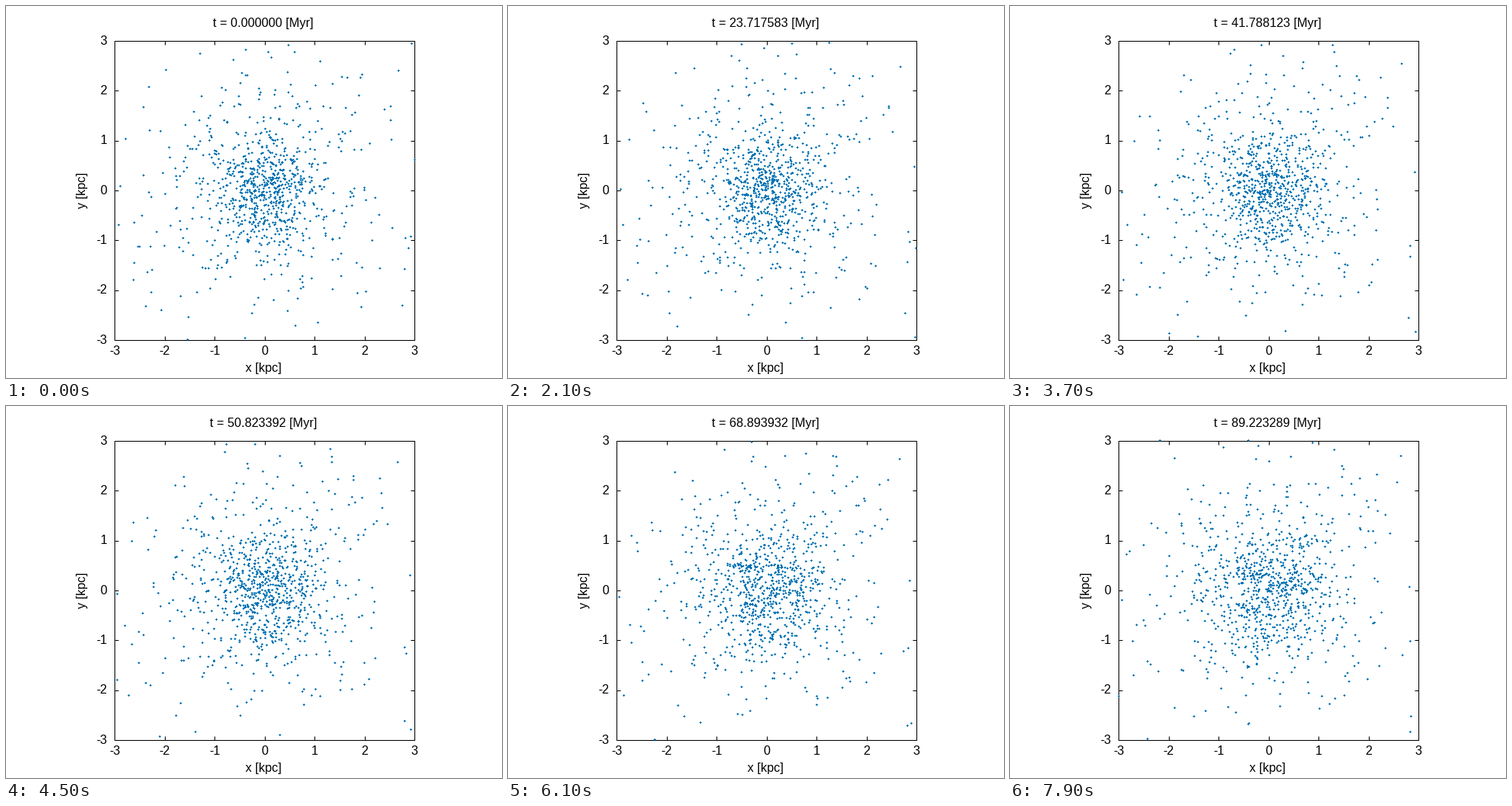
These frames come from a looping animation (640x480 px, 8000 ms). A matplotlib script:

```python
import matplotlib.pyplot as plt
import numpy as np
from matplotlib.animation import FuncAnimation
from matplotlib.path import Path

W, H, DPI = 640, 480, 100
PX = 72 / DPI                      # one pixel in points
FRAMES, INTERVAL = 80, 100
DT = 1.12940872                    # Myr per frame
N, A, GM = 1000, 0.93, 4.5e-4      # stars, scale radius [kpc], kpc^3/Myr^2
HEAT = 1.12                        # slightly faster than equilibrium
LEFT, RIGHT, TOP, BOTTOM = 140, 527, 45, 431

plt.rcParams["font.family"] = "Liberation Sans"
plt.rcParams["font.size"] = 16 * PX


def directions(rng, n):
    v = rng.normal(size=(n, 3))
    return v / np.linalg.norm(v, axis=1, keepdims=True)


def plummer(rng):
    """Positions and velocities of a Plummer sphere."""
    r = A / np.sqrt(rng.uniform(0.001, 0.998, N) ** (-2 / 3) - 1)
    escape = np.sqrt(2 * GM) * (r * r + A * A) ** -0.25
    speed = HEAT * escape * np.sqrt(rng.beta(1.5, 4.5, N))
    return r[:, None] * directions(rng, N), speed[:, None] * directions(rng, N)


def accel(p):
    r2 = (p * p).sum(axis=1, keepdims=True)
    return -GM * p * (r2 + A * A) ** -1.5


def orbits(substeps=4):
    """Leapfrog the stars and keep the x-y projection of every frame."""
    p, v = plummer(np.random.default_rng(12))
    h = DT / substeps
    track = []
    for _ in range(FRAMES):
        xy = p[:, :2].copy()
        xy[(np.abs(xy) > 3).any(axis=1)] = np.nan
        track.append(xy)
        for _ in range(substeps):
            v = v + accel(p) * h / 2
            p = p + v * h
            v = v + accel(p) * h / 2
    return track


def label(x, y, s, ha="center", **kw):
    return fig.text(x / W, 1 - y / H, s, ha=ha, va="baseline", **kw)


fig = plt.figure(figsize=(W / DPI, H / DPI), dpi=DPI, facecolor="white")
ax = fig.add_axes([LEFT / W, 1 - BOTTOM / H, (RIGHT - LEFT) / W, (BOTTOM - TOP) / H])
ticks = range(-3, 4)
ax.set(xlim=(-3, 3), ylim=(-3, 3), xticks=ticks, yticks=ticks)
ax.tick_params(direction="in", top=True, right=True, length=5 * PX, width=PX,
               labelbottom=False, labelleft=False)
for spine in ax.spines.values():
    spine.set_linewidth(PX)

for k in ticks:
    f = (k + 3) / 6
    label(LEFT + f * (RIGHT - LEFT), 450.5, str(k))
    label(130.5, BOTTOM - f * (BOTTOM - TOP) + 4.5, str(k), ha="right")
label(332, 472, "x [kpc]")
label(103, 238, "y [kpc]", rotation=90, rotation_mode="anchor")
title = label(332.2, 27, "")

# three-pixel plus sign on the pixel grid
plus = Path([(0, -1), (1, -1), (1, 0), (2, 0), (2, 1), (1, 1), (1, 2),
             (0, 2), (0, 1), (-1, 1), (-1, 0), (0, 0), (0, -1)], closed=True)
stars, = ax.plot([], [], ls="none", marker=plus, ms=4 * PX, mew=0,
                 mfc="#0072b2", mec="none", clip_on=False, zorder=3)
track = orbits()


def draw(i):
    stars.set_data(*track[i].T)
    title.set_text(f"t = {i * DT:.6f} [Myr]")
    return stars, title


anim = FuncAnimation(fig, draw, frames=FRAMES, interval=INTERVAL,
                     repeat=True, repeat_delay=0)
plt.show()
```
